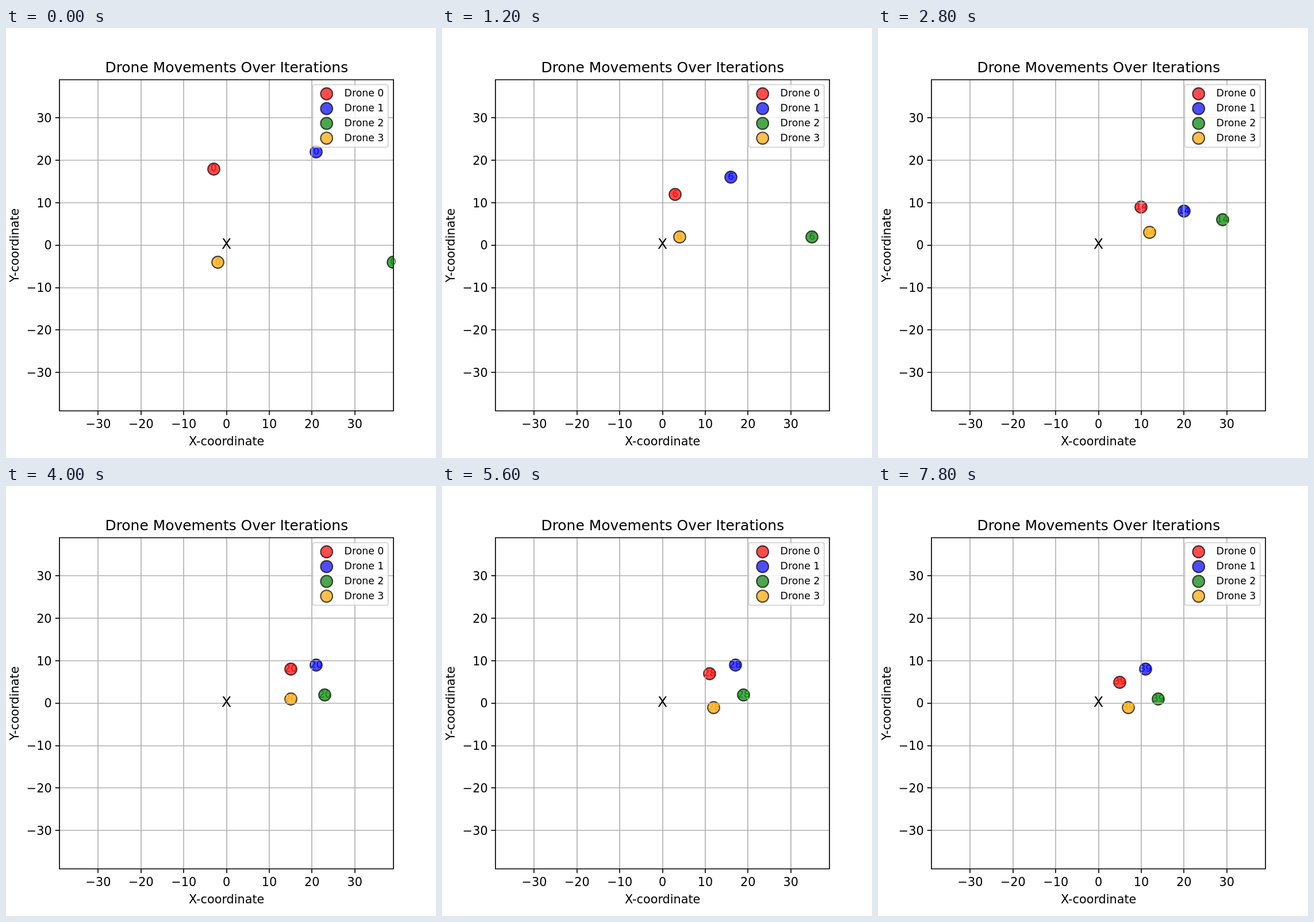
Write an HTML page that moves like this. It is 748 px wide and 748 px high and loops after 8 s.

```html
<!DOCTYPE html>
<html lang="en">
<head>
<meta charset="utf-8">
<title>Drone Movements</title>
<style>
  html, body { margin: 0; width: 100%; height: 100%; overflow: hidden; background: #fff; }
  svg { display: block; width: 100%; height: 100%; }
  text { font: 20.78px "DejaVu Sans", sans-serif; text-anchor: middle; }
  .title, .origin { font-size: 24.93px; }
  .end { text-anchor: end; }
  .legend { font-size: 17.31px; text-anchor: start; }
  .step { font-size: 16.62px; }
  .grid { stroke: #b0b0b0; stroke-width: 1.67; }
  .axis { stroke: #000; stroke-width: 1.67; fill: none; }
  .dot { stroke: #000; stroke-width: 2.08; fill-opacity: .7; stroke-opacity: .7; }
  .box { fill: #fff; stroke: #ccc; stroke-width: 2.08; opacity: .8; }
</style>
</head>
<body>
<svg viewBox="0 0 748 748">
  <clipPath id="plot"><rect x="93.5" y="89.8" width="580.1" height="576"/></clipPath>
  <g id="dots" clip-path="url(#plot)"></g>
  <g id="axes"></g>
  <g id="labels"></g>
  <g id="legend"></g>
</svg>
<script>
const STEP_MS = 200, STEPS = 40, GROUPED = 20;

// Each drone flies straight between the places it holds at these steps.
const turns = [0, 6, 14, GROUPED, 28, 33, 39];
const drones = [
  { color: 'red', path: [[-3, 18], [3, 12], [10, 9], [15, 8], [15, 7], [15, 5], [15, 5]] },
  { color: 'blue', path: [[21, 22], [16, 16], [20, 8], [21, 9], [21, 9], [21, 8], [21, 8]] },
  { color: 'green', path: [[39, -4], [35, 2], [29, 6], [23, 2], [23, 2], [24, 2], [24, 1]] },
  { color: 'orange', path: [[-2, -4], [4, 2], [12, 3], [15, 1], [16, -1], [17, -1], [17, -1]] }
];

// Once grouped, all drift left together: two steps on, two steps of rest.
function drift(step) {
  const t = Math.max(0, step - GROUPED);
  return 2 * Math.floor(t / 4) + Math.min(t % 4, 2);
}

function position(path, step) {
  const i = Math.max(1, turns.findIndex(turn => turn >= step));
  const k = (step - turns[i - 1]) / (turns[i] - turns[i - 1]);
  const [x, y] = path[i].map((to, n) => Math.round(path[i - 1][n] * (1 - k) + to * k));
  return [x - drift(step), y];
}

const px = x => 383.58 + 7.438 * x;
const py = y => 377.74 - 7.384 * y;
const pixelCenter = v => Math.floor(v) + 0.5;

function add(parent, tag, attrs, text = '') {
  const node = document.createElementNS('http://www.w3.org/2000/svg', tag);
  for (const key in attrs) node.setAttribute(key, attrs[key]);
  node.textContent = text;
  return document.getElementById(parent).appendChild(node);
}
const line = (cls, d) => add('axes', 'path', { class: cls, d });
const label = (parent, cls, x, y, text, more) =>
  add(parent, 'text', { class: cls, x, y, ...more }, text);

const ticks = Array.from({ length: 7 }, (_, i) => 10 * (i - 3));
for (const v of ticks) {
  line('grid', `M${Math.round(px(v))} 90V666`);
  line('grid', `M93 ${Math.round(py(v))}H674`);
}
for (const v of ticks) {
  const x = Math.round(px(v)), y = Math.round(py(v));
  const text = String(v).replace('-', '\u2212');
  line('axis', `M${x} 666v7.3`);
  line('axis', `M93 ${y}h-7.3`);
  label('axes', '', px(v), 696, text);
  label('axes', 'end', 79.6, py(v) + 7.7, text);
}
line('axis', 'M93 90H674V666H93Z');

label('labels', 'title', 383.8, 77, 'Drone Movements Over Iterations');
label('labels', '', 383.6, 726, 'X-coordinate');
label('labels', '', 0, 0, 'Y-coordinate', { transform: 'translate(22 378) rotate(-90)' });
label('labels', 'origin', px(0), 384, 'X');

add('legend', 'rect', { class: 'box', x: 533.5, y: 98.5, width: 131.3, height: 109, rx: 3.5 });
drones.forEach((drone, i) => {
  const dot = { class: 'dot', r: 10.39, fill: drone.color };
  add('legend', 'circle', { ...dot, cx: 557.7, cy: 114.5 + 25.7 * i });
  label('legend', 'legend', 588.6, 119 + 26 * i, `Drone ${i}`);
  drone.dot = add('dots', 'circle', dot);
  drone.label = label('labels', 'step', 0, 0, '', { fill: drone.color });
});

let shown = -1;
function draw(now) {
  const step = Math.floor(now / STEP_MS) % STEPS;
  if (step === shown) return;
  shown = step;
  for (const { path, dot, label } of drones) {
    const [x, y] = position(path, step);
    dot.setAttribute('cx', pixelCenter(px(x)));
    dot.setAttribute('cy', pixelCenter(py(y) + 0.3));
    label.setAttribute('x', px(x));
    label.setAttribute('y', py(y) + 4.6);
    label.textContent = step;
  }
}

const start = performance.now();
function tick() {
  draw(performance.now() - start);
  requestAnimationFrame(tick);
}
tick();
</script>
</body>
</html>
```
